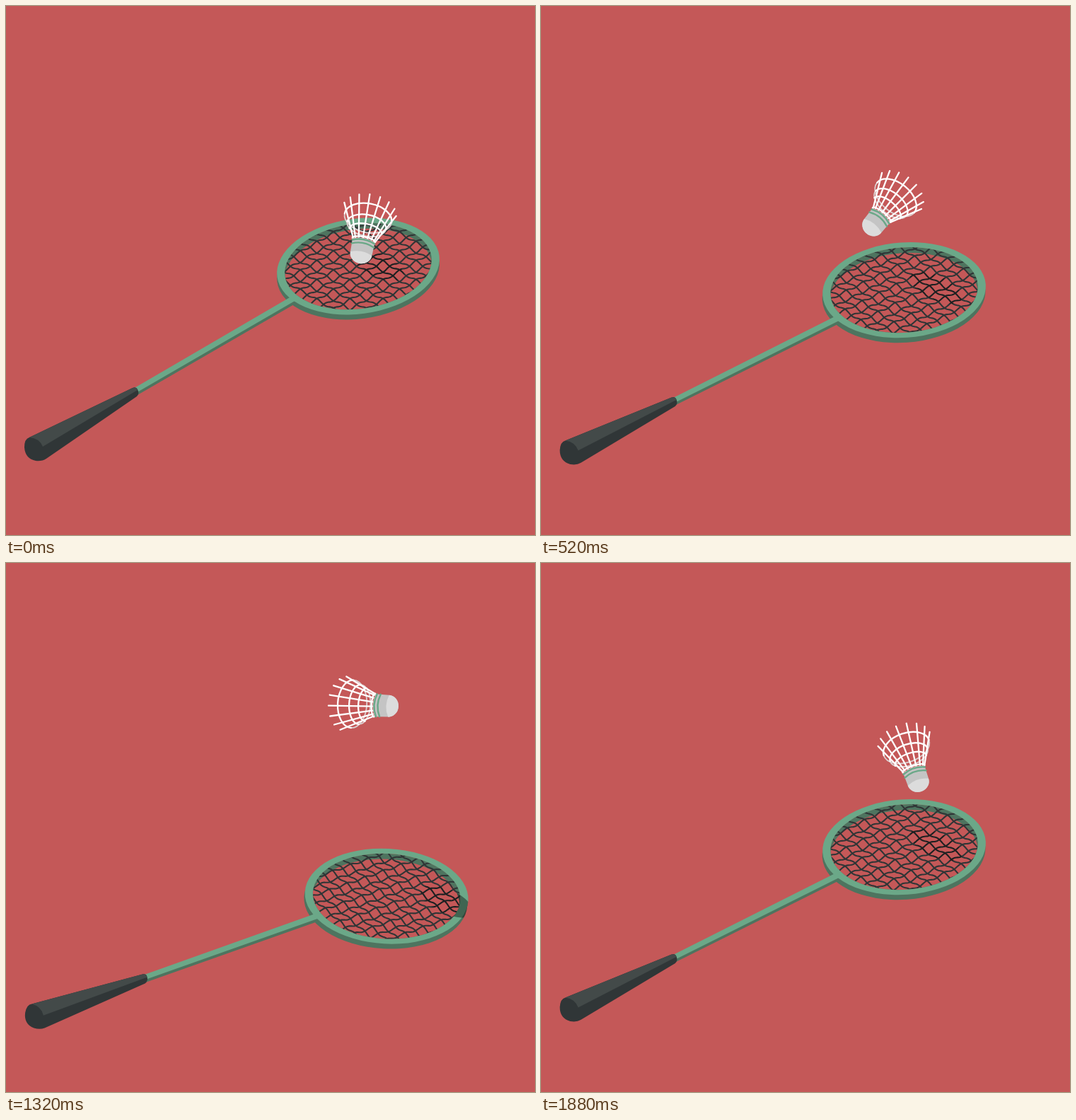
An HTML page with a canvas that plays this animation: 748x748 px, repeating every 1920 ms.

```html
<!DOCTYPE html>
<html lang="en">
<head>
<meta charset="utf-8">
<title>Badminton</title>
<style>
html, body { margin: 0; width: 100%; height: 100%; overflow: hidden; background: #c45858; }
canvas { display: block; width: 100vmin; height: 100vmin; }
</style>
</head>
<body>
<canvas id="stage" width="748" height="748"></canvas>
<script>
const ctx = document.getElementById('stage').getContext('2d');
const RAD = Math.PI / 180, STEP = 40, BOUNCE = 480, LOOP = 1920;
const GREEN = '#6ba888', SHADE = '#4e745f', GRIP = '#303637', GRIP_TOP = '#434a49', STRING = '#2f3536';
const HEAD = { x: 498, y: 368, tilt: -7.5 * RAD };

// One bounce: time, shuttle x, y, shuttle angle, racket angle
const KEYS = [
  [0, 510, 310, 11, 0],
  [40, 495, 279, 39, 3.54],
  [120, 508, 203, 95, 10.6],
  [200, 510, 164, 152, 14.5],
  [240, 509, 163, 182, 15],
  [280, 506, 167, 212, 14.5],
  [360, 500, 200, 273, 10.6],
  [440, 520, 271, 341, 3.54]
];

function key(i) {
  const n = KEYS.length, turn = Math.floor(i / n);
  const [t, x, y, spin, swing] = KEYS[i - turn * n];
  return [t + turn * BOUNCE, x, y, spin + turn * 360, swing];
}

// Smooth curve through the keys
function pose(t) {
  let i = 0;
  while (key(i + 1)[0] <= t) i++;
  const [a, b, c, d] = [i - 1, i, i + 1, i + 2].map(key);
  const h = c[0] - b[0], u = (t - b[0]) / h;
  return [1, 2, 3, 4].map(k => {
    const m0 = (c[k] - a[k]) / (c[0] - a[0]) * h;
    const m1 = (d[k] - b[k]) / (d[0] - b[0]) * h;
    const rise = c[k] - b[k];
    return b[k] + u * (m0 + u * (3 * rise - 2 * m0 - m1 + u * (m0 + m1 - 2 * rise)));
  });
}

function fill(path, color, rule = 'nonzero') {
  ctx.fillStyle = color;
  ctx.fill(path, rule);
}

function line(path, color, width) {
  ctx.strokeStyle = color;
  ctx.lineWidth = width;
  ctx.stroke(path);
}

function oval(rx, ry, dy = 0) {
  const p = new Path2D();
  p.ellipse(HEAD.x, HEAD.y + dy, rx, ry, HEAD.tilt, 0, 2 * Math.PI);
  return p;
}

function join(...paths) {
  const p = new Path2D();
  paths.forEach(q => p.addPath(q));
  return p;
}

// Woven strings: two sets of parallel wavy lines on an isometric grid
function weave() {
  const p = new Path2D(), cell = 13.5;
  const c = Math.cos(30 * RAD), s = Math.sin(30 * RAD);
  for (const side of [-1, 1]) {
    for (let n = -10; n <= 10; n++) {
      for (let d = -160; d <= 160; d += 2) {
        const wave = 1.7 * side * Math.cos(d / cell * Math.PI);
        const x = HEAD.x + (d + n * cell) * c;
        const y = HEAD.y + (d - n * cell) * s * side + wave;
        d === -160 ? p.moveTo(x, y) : p.lineTo(x, y);
      }
    }
  }
  return p;
}

const outer = oval(115.6, 67.3), hole = oval(104.5, 60.3);
const rim = join(outer, hole);
const rimSide = join(oval(115.6, 67.3, 7), hole);
const innerWall = join(outer, oval(104.5, 60.3, 8));
const strings = weave();
const shaft = new Path2D('M180 541 L403 411 L411 415.5 L184 547Z');
const shaftSide = new Path2D('M180 544 L404 412 L415 417.5 L186 550Z');
const grip = new Path2D('M33 610 L179 540 Q184 538 186 542 Q189 548 185 552 L57 640 Q51 644 42 643 Q27 640 26 624 Q26 612 33 610Z');
const gripTop = new Path2D('M33 610 L179 540 Q184 538 186 543 L52 623 Q47 611 33 610Z');

function drawRacket(swing) {
  ctx.save();
  ctx.translate(-38, 636);
  ctx.rotate(swing * RAD);
  ctx.translate(38, -636);
  fill(rimSide, SHADE, 'evenodd');
  ctx.save();
  ctx.clip(hole);
  fill(innerWall, SHADE, 'evenodd');
  line(strings, STRING, 2.1);
  ctx.restore();
  fill(shaftSide, SHADE);
  fill(shaft, GREEN);
  fill(rim, GREEN, 'evenodd');
  fill(grip, GRIP);
  fill(gripTop, GRIP_TOP);
  ctx.restore();

  // Shuttle's shadow, falling on the racket only
  ctx.globalCompositeOperation = 'source-atop';
  const shadow = new Path2D();
  shadow.ellipse(526 + 9.2 * swing, 366 + (8.4 + 0.21 * swing) * swing, 40, 17, 25 * RAD, 0, 2 * Math.PI);
  fill(shadow, 'rgba(0,0,0,.4)');
  ctx.globalCompositeOperation = 'source-over';
}

// Skirt ring, k along the ribs from the neck (0) to their ends (1)
function ring(k, front) {
  const p = new Path2D();
  p.ellipse(0, -18 - 41 * k, 16 + 22.5 * k, 4 + 21 * k, 0, 0, Math.PI, front);
  return p;
}

const ribs = new Path2D();
for (let i = 0; i < 8; i++) {
  const a = (86 - 23 * i) * RAD, s = Math.sin(a), c = Math.cos(a);
  ribs.moveTo(16 * s, -18 - 4 * c);
  ribs.lineTo(38.5 * s, -59 - 25 * c);
}
const cork = new Path2D('M-16 -18 Q0 -25 16 -18 L15.5 1 A15.5 14 0 0 1 -15.5 1Z');
const tip = new Path2D('M-15.5 1 Q0 -6 15.5 1 A15.5 14 0 0 1 -15.5 1Z');
const bands = new Path2D('M-16 -16 Q0 -23 16 -16 M-15.8 -11 Q0 -18 15.8 -11');

function drawShuttle(x, y, spin) {
  ctx.save();
  ctx.translate(x, y);
  ctx.rotate(spin * RAD);
  ctx.translate(0, 40);
  for (const k of [0.79, 0.53]) line(ring(k, false), '#dccfcf', 1.8);
  line(ribs, '#fff', 2.3);
  for (const k of [0.79, 0.53, 0.32, 0.02]) line(ring(k, true), '#fff', 2.3);
  fill(cork, '#c4c4c4');
  line(bands, GREEN, 2.4);
  fill(tip, '#dcdcdc');
  ctx.restore();
}

function draw(now) {
  const t = Math.floor(now % LOOP / STEP) * STEP;
  const [x, y, spin, swing] = pose(t % BOUNCE);
  ctx.clearRect(0, 0, 748, 748);
  drawRacket(swing);
  drawShuttle(x, y, spin);
}

let start;
function tick(now) {
  start ??= now;
  draw(now - start);
  requestAnimationFrame(tick);
}
ctx.lineCap = ctx.lineJoin = 'round';
draw(0);
requestAnimationFrame(tick);
</script>
</body>
</html>
```
